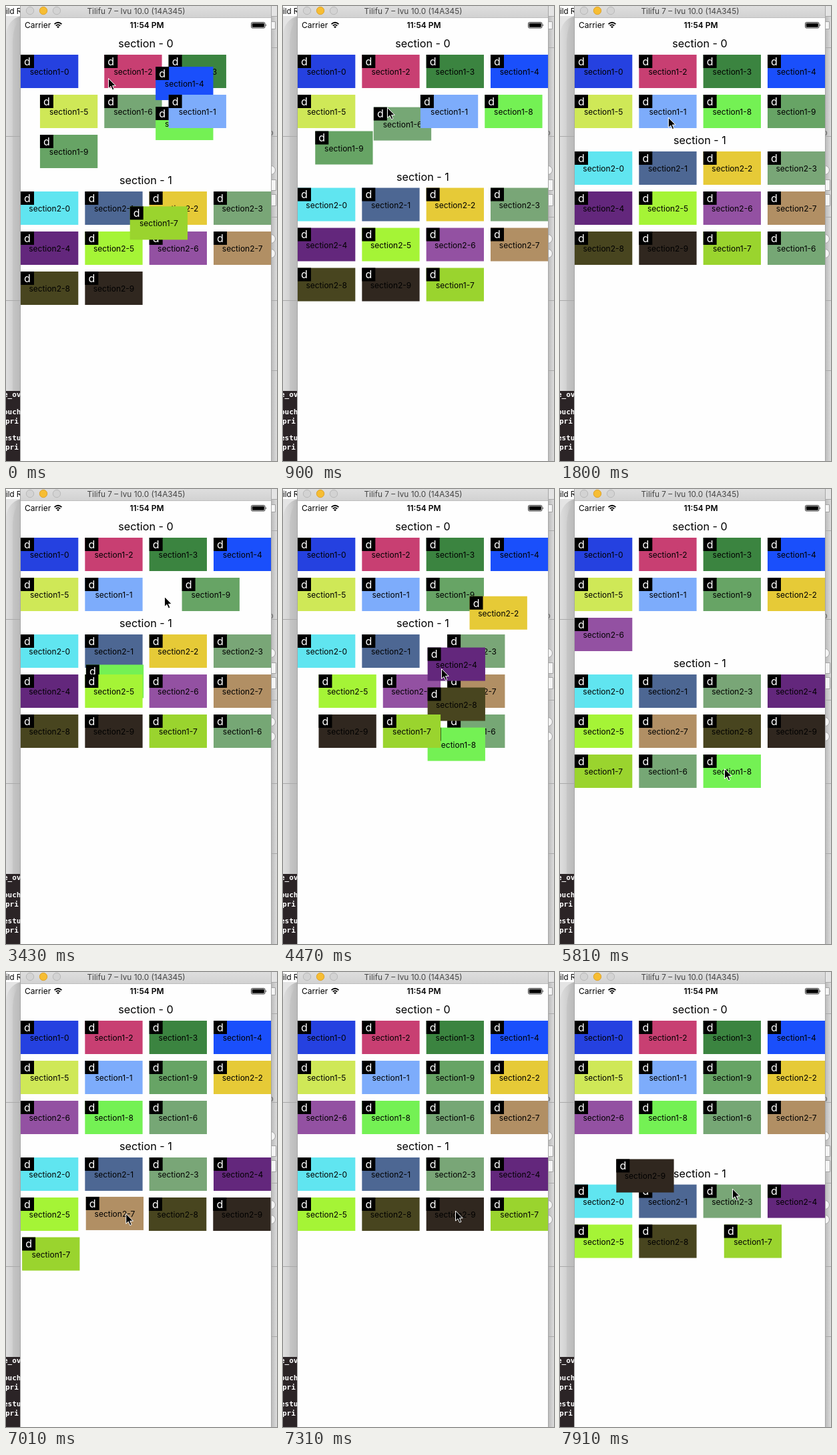
Write an HTML page that moves like this. It is 406 by 682 pixels and loops after 8 s.

```html
<!DOCTYPE html>
<html lang="en">
<head>
<meta charset="utf-8">
<title>Collection view moves</title>
<style>
  html, body { margin: 0; width: 100%; height: 100%; overflow: hidden; background: #e2e2e2; }
  svg { display: block; width: 406px; height: 682px; font-family: Inter, Roboto, sans-serif; }
  .mono { font: bold 11px "DejaVu Sans Mono", monospace; fill: #fff; white-space: pre; }
</style>
</head>
<body>
<svg id="stage" viewBox="0 0 406 682">
  <defs>
    <linearGradient id="shadeL"><stop offset="0" stop-color="#dedede"/><stop offset=".5" stop-color="#cfcfcf"/><stop offset="1" stop-color="#b4b4b4"/></linearGradient>
    <linearGradient id="shadeR"><stop offset="0" stop-color="#b9b9b9"/><stop offset="1" stop-color="#dcdcdc"/></linearGradient>
    <linearGradient id="bar" x2="0" y2="1"><stop offset="0" stop-color="#dedede"/><stop offset="1" stop-color="#d2d2d2"/></linearGradient>
    <clipPath id="screen"><rect x="22" y="17" width="375" height="665"/></clipPath>
  </defs>

  <!-- desktop behind the window -->
  <g id="desktop">
    <rect width="406" height="682" fill="#e4e4e4"/>
    <rect width="22" height="15" fill="#fff"/>
    <text y="12" font-size="11.5">ild R</text>
    <path d="M0 42Q3 20 22 15V577H0Z" fill="url(#shadeL)"/>
    <path d="M10 577V52Q11 28 22 20V577Z" fill="#bdbdbd" opacity=".55"/>
    <path d="M0 195.500H22M0 441.500H22" stroke="#a9a9a9"/>
    <rect y="577" width="22" height="105" fill="#2b2426"/>
    <g class="mono">
      <text x="-4" y="586">e_ov</text><text x="-4" y="612">ouch</text><text x="-1" y="626"> pri</text>
      <text x="-4" y="651">estu</text><text x="-1" y="665"> pri</text>
    </g>
    <rect x="397" y="15" width="9" height="667" fill="url(#shadeR)"/>
    <path d="M397 15.500H406M397 62.500H406M397 195.500H406M397 316.500H406M397 441.500H406M397 546.500H406" stroke="#a9a9a9"/>
    <g fill="#f4f4f4" stroke="#a2a2a2">
      <path d="M397 23.500H403.500V34.500H397M397 260.500H404.500V276.500H397M397 282.500H404.500V299.500H397"/>
      <circle cx="397" cy="246" r="6.500"/><circle cx="397" cy="349" r="6.500"/><circle cx="397" cy="371" r="6.500"/>
    </g>
    <text x="394" y="194" font-size="11" fill="#555">o</text>
  </g>

  <!-- simulator window -->
  <rect x="21" width="377" height="682" fill="#a6a6a6"/>
  <rect x="22" width="375" height="17" fill="url(#bar)"/>
  <rect x="22" y="17" width="375" height="665" fill="#fefefe"/>
  <path d="M22 17.500H397" stroke="#bdbdbd"/>
  <g fill="#d3d3d3" stroke="#b9b9b9">
    <circle cx="36" cy="7" r="5.700"/><circle cx="76" cy="7" r="5.700"/>
    <circle cx="56" cy="7" r="5.700" fill="#f6bd33" stroke="#dea32c"/>
  </g>
  <text x="195" y="11.800" font-size="11.800" fill="#444" text-anchor="middle">Tilifu 7 – Ivu 10.0 (14A345)</text>

  <!-- status bar -->
  <text x="28" y="33" font-size="12">Carrier</text>
  <g fill="none" stroke="#000" stroke-width="1.700">
    <path d="M72.500 27.200Q78 22.300 83.500 27.200M74.700 29.500Q78 26.600 81.300 29.500"/>
  </g>
  <path d="M76 31Q78 29.300 80 31L78 33.200Z"/>
  <text x="211" y="33" font-size="12" font-weight="600" text-anchor="middle">11:54 PM</text>
  <rect x="367.500" y="24.500" width="20.500" height="8.500" rx="1.800" fill="none" stroke="#000" stroke-width=".8"/>
  <rect x="368.700" y="25.700" width="18.100" height="6.100" rx=".8"/>
  <path d="M389.200 27Q391 28.700 389.200 30.500Z"/>

  <g id="list" clip-path="url(#screen)"></g>
  <path id="cursor" d="M0 0V15L3.500 11.800 6 17.400 8.400 16.300 6 10.900H10.700Z" stroke="#fff" stroke-width="1"/>
</svg>

<script>
const LOOP = 8000, TICK = 149.2, DURATION = 300;

// Back to front.
const COLORS = {
  "1-0": "#2541e0", "1-2": "#c83f72", "1-3": "#3b8440", "1-5": "#cfe857", "1-9": "#67a465",
  "2-0": "#60e5f0", "2-1": "#4d6793", "2-2": "#e6ca37", "2-3": "#79a677", "2-6": "#9351a2",
  "2-7": "#b18f64", "1-6": "#76a775", "1-8": "#74f154", "1-4": "#1a4ffb", "2-4": "#63277c",
  "2-5": "#a5f436", "2-8": "#48451f", "2-9": "#30271f", "1-7": "#9ad42e", "1-1": "#7dacfb"
};

const START = [
  "1-0 1-7 1-2 1-3 1-4 1-5 1-6 1-1 1-8 1-9",
  "2-0 2-1 2-2 2-3 2-4 2-5 2-6 2-7 2-8 2-9"
].map(row => row.split(" "));

// [start time, cell]: the cell goes to the end of the other section.
const MOVES = [
  [-186, "1-7"], [832, "1-6"], [3283, "1-8"], [4295, "2-2"], [5488, "2-6"],
  [6095, "1-8"], [6543, "1-6"], [6994, "2-7"], [7726, "2-9"]
];

// [time, x, y]
const POINTER = [
  [0, 153.5, 108.5], [750, 156.5, 152.5], [1350, 156.5, 152.5], [1800, 162.5, 167.5],
  [2540, 210.5, 187.5], [3130, 237.5, 161.5], [3590, 237.5, 161.5], [4030, 237.5, 269.5],
  [4620, 237.5, 269.5], [5370, 166, 305], [5500, 166, 305], [5810, 246.5, 419.5],
  [6270, 246.5, 419.5], [6540, 177, 417], [6720, 177, 417], [7000, 176.5, 362.5],
  [7310, 258.5, 358], [7760, 258.5, 356], [7900, 258.5, 325]
];

const list = document.getElementById("list");
const cursor = document.getElementById("cursor");

function add(parent, tag, attrs, text = "") {
  const el = document.createElementNS("http://www.w3.org/2000/svg", tag);
  for (const key in attrs) el.setAttribute(key, attrs[key]);
  el.textContent = text;
  return parent.appendChild(el);
}

const place = (el, x, y) => el.setAttribute("transform", `translate(${x.toFixed(2)} ${y.toFixed(2)})`);
const mix = (a, b, p) => a + (b - a) * p;

function makeHeader(index) {
  return add(list, "text", { x: 209.5, y: 62, "font-size": 16.2, "text-anchor": "middle" }, `section - ${index}`);
}

function makeCell(id) {
  const cell = add(list, "g", {});
  add(cell, "rect", { width: 86.3, height: 50, fill: COLORS[id] });
  add(cell, "rect", { width: 20, height: 20 });
  add(cell, "text", { x: 10, y: 15.8, "font-size": 16, fill: "#fff", "text-anchor": "middle" }, "d");
  add(cell, "text", { x: 43.2, y: 30, "font-size": 12, "text-anchor": "middle" }, `section${id}`);
  return cell;
}

function layout(sections) {
  const header = 81 + 60 * Math.ceil(sections[0].length / 4);
  const spots = {};
  sections.forEach((ids, s) => ids.forEach((id, i) => {
    spots[id] = [22 + (i % 4) * 289 / 3, (s ? header + 17 : 73) + 60 * Math.floor(i / 4)];
  }));
  return { header, spots };
}

function buildLayouts() {
  let sections = START;
  const layouts = [layout(sections)];
  for (const [, id] of MOVES) {
    sections = sections.map(ids => ids.includes(id) ? ids.filter(other => other !== id) : [...ids, id]);
    layouts.push(layout(sections));
  }
  return layouts;
}

// Cubic Bezier (.42, 0, .58, 1), solved by bisection.
function easeInOut(x) {
  if (x >= 1) return 1;
  let low = 0, high = 1;
  for (let i = 0; i < 24; i++) {
    const s = (low + high) / 2, r = 1 - s;
    if (1.26 * s * r * r + 1.74 * s * s * r + s ** 3 < x) low = s; else high = s;
  }
  return low * low * (3 - 2 * low);
}

function pointerAt(t) {
  const next = POINTER.findIndex(key => key[0] > t);
  if (next < 0) return POINTER[POINTER.length - 1].slice(1);
  const [t0, x0, y0] = POINTER[next - 1], [t1, x1, y1] = POINTER[next];
  const p = (t - t0) / (t1 - t0);
  return [mix(x0, x1, p), mix(y0, y1, p)];
}

makeHeader(0);
const lowerHeader = makeHeader(1);
const cells = Object.keys(COLORS).map(id => [id, makeCell(id)]);
const layouts = buildLayouts();

function render(time) {
  const t = Math.floor((time % LOOP + 14) / TICK) * TICK;
  const current = MOVES.filter(move => move[0] <= t).length - 1;
  const p = easeInOut((t - MOVES[current][0]) / DURATION);
  const from = layouts[current], to = layouts[current + 1];

  place(lowerHeader, 0, mix(from.header, to.header, p) - 56);
  for (const [id, cell] of cells) {
    const [x0, y0] = from.spots[id], [x1, y1] = to.spots[id];
    place(cell, mix(x0, x1, p), mix(y0, y1, p));
  }
  place(cursor, ...pointerAt(t));
}

const begin = performance.now();
function loop() {
  render(performance.now() - begin);
  requestAnimationFrame(loop);
}
loop();
</script>
</body>
</html>
```
